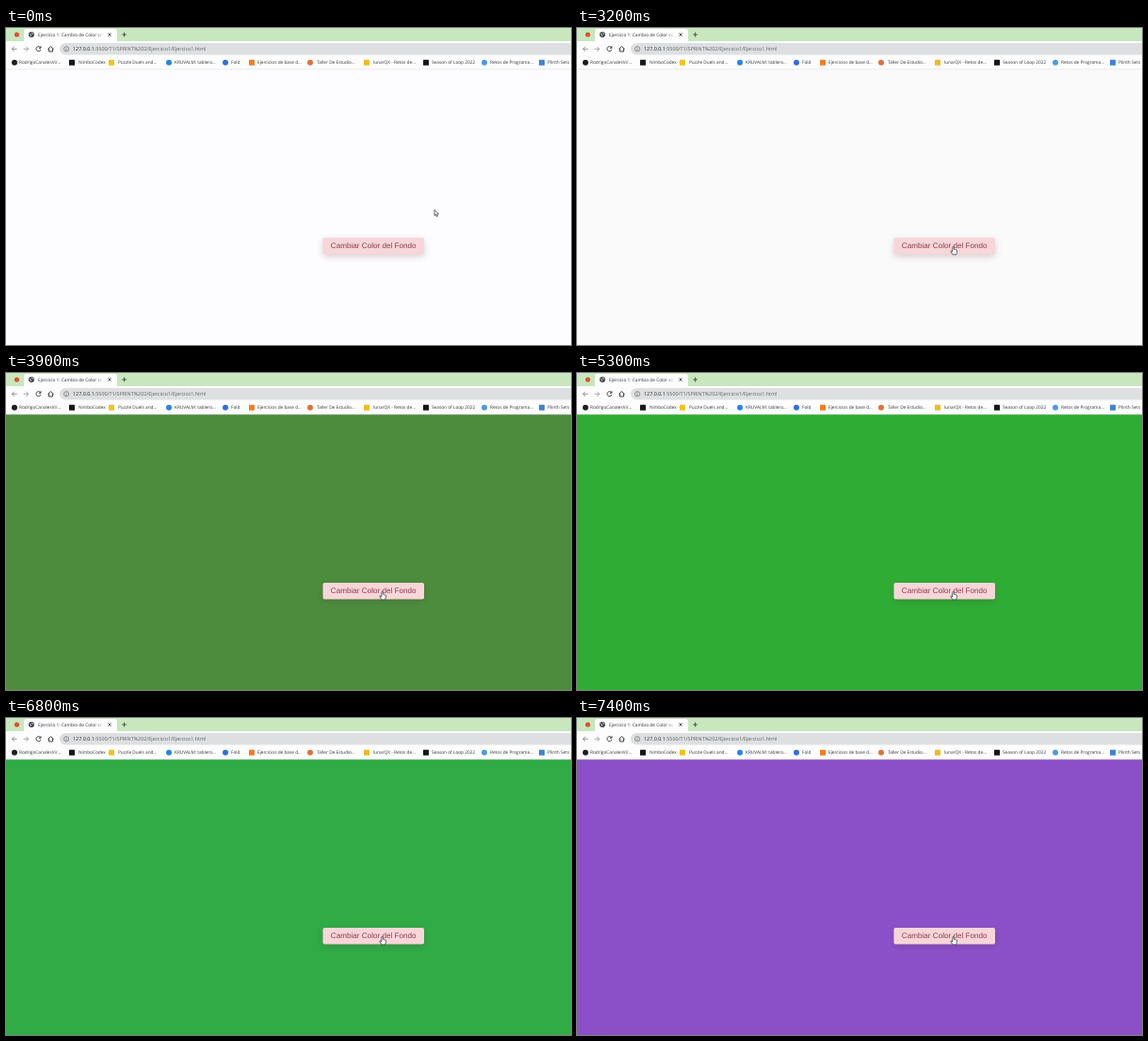
An HTML page with a canvas that plays this animation: 600x337 px, repeating every 8000 ms.

```html
<!DOCTYPE html>
<html lang="es">
<head>
<meta charset="utf-8">
<title>Ejercicio 1</title>
<style>
html, body { margin: 0; width: 100%; height: 100%; overflow: hidden; background: #fdfcfe; }
canvas { display: block; width: 600px; height: 337px; }
</style>
</head>
<body>
<canvas id="stage"></canvas>
<script>
const W = 600, H = 337, LOOP = 8000, STEP = 100;
const UI = '"Open Sans", "Noto Sans", sans-serif';
const canvas = document.getElementById('stage');
const ctx = canvas.getContext('2d');
const dpr = window.devicePixelRatio || 1;
canvas.width = Math.round(W * dpr);
canvas.height = Math.round(H * dpr);

const WHITE = [253, 252, 254], MOSS = [76, 140, 60], LIME = [32, 187, 47], PURPLE = [139, 80, 200];
const clamp = v => Math.max(0, Math.min(1, v));
const smooth = p => p * p * (3 - 2 * p);
const easeOut = p => 1 - (1 - p) ** 3;
const span = (t, a, b) => clamp((t - a) / (b - a));
const mix = (a, b, p) => a.map((v, i) => v + (b[i] - v) * p);
const rgb = c => `rgb(${c.map(Math.round).join()})`;

// Equivalent of the CSS "ease" curve
function ease(p) {
  if (p <= 0 || p >= 1) return clamp(p);
  let lo = 0, hi = 1;
  for (let i = 0; i < 20; i++) {
    const u = (lo + hi) / 2, v = 1 - u;
    if (3 * v * v * u * 0.25 + 3 * v * u * u * 0.25 + u ** 3 < p) lo = u; else hi = u;
  }
  const u = lo, v = 1 - u;
  return 3 * v * v * u * 0.1 + 3 * v * u * u + u ** 3;
}

function box(x, y, w, h, color, r = 0) {
  ctx.fillStyle = color;
  ctx.beginPath();
  ctx.roundRect(x, y, w, h, r);
  ctx.fill();
}

function dot(x, y, r, color) {
  ctx.fillStyle = color;
  ctx.beginPath();
  ctx.arc(x, y, r, 0, Math.PI * 2);
  ctx.fill();
}

function stroke(d, color, width = 0.8) {
  ctx.strokeStyle = color;
  ctx.lineWidth = width;
  ctx.stroke(new Path2D(d));
}

function text(s, x, y, size, color, family = UI) {
  ctx.font = `${size}px ${family}`;
  ctx.fillStyle = color;
  ctx.fillText(s, x, y);
  return ctx.measureText(s).width;
}

const bookmarks = [
  [9, 14, 'RodrigoCanalesVi/...', '#1b1f23', true],
  [70, 77, 'NimboCodex', '#14191e'],
  [112, 119, 'Puzzle Duels and...', '#f2c21c'],
  [173, 179, 'KRUVALM: tablero...', '#2684e8', true],
  [233, 239, 'Fold', '#2f6fe0', true],
  [261, 267, 'Ejercicios de base d...', '#f57d20'],
  [323, 330, 'Taller De Estudio...', '#e2703a', true],
  [383, 390, 'lunarQX - Retos de...', '#eebc20'],
  [446, 452, 'Season of Loop 2022', '#14181c'],
  [508, 514, 'Retos de Programa...', '#4a9be0', true],
  [569, 575, 'Plinth Sets', '#3f83d8']
];

function drawTabs() {
  box(0, 0, W, 15, '#c8e7be');
  box(19, 1, 99, 14, '#fdfdfe', [3, 3, 0, 0]);
  dot(11.5, 7, 2.6, '#e0502f');
  dot(27, 7, 3, '#3f4347');
  stroke('M25 6.2 L26.6 7 L26.2 8.8 M27.2 4.6 L28 6 L29.2 6.4', '#e8eaec', 0.8);
  text('Ejercicio 1: Cambio de Color con', 34, 8.8, 4.8, '#2e3134');
  const fade = ctx.createLinearGradient(97, 0, 103, 0);
  fade.addColorStop(0, 'rgba(253,253,254,0)');
  fade.addColorStop(1, '#fdfdfe');
  box(97, 2, 6, 11, fade);
  box(103, 2, 14, 11, '#fdfdfe');
  stroke('M108.4 5.4 L111.6 8.6 M111.6 5.4 L108.4 8.6', '#2e3134', 0.8);
  stroke('M123.2 7 H128 M125.6 4.6 V9.4', '#2e3134', 0.8);
}

function drawToolbar() {
  box(0, 14, W, 30, '#fdfdfe');
  box(57, 16, 560, 12.5, '#dedfe0', 6.2);
  stroke('M11.6 22.3 H6.5 M8.9 19.8 L6.4 22.3 L8.9 24.8', '#74787c');
  stroke('M18.6 22.3 H23.7 M21.3 19.8 L23.8 22.3 L21.3 24.8', '#8c9094');
  stroke('M36.6 20.8 A2.5 2.5 0 1 0 36.9 23', '#26292c', 0.9);
  stroke('M37 19.3 V21.3 H35', '#26292c', 0.9);
  stroke('M44.6 22.4 L47.6 19.6 L50.6 22.4 M45.6 22 V25 H49.6 V22', '#26292c', 0.9);
  stroke('M61.5 22.3 a2.6 2.6 0 1 0 5.2 0 a2.6 2.6 0 1 0 -5.2 0 M64.1 22 V23.8 M64.1 20.7 V21.3', '#505458', 0.6);
  const w = text('127.0.0.1', 71, 24.2, 5.4, '#1e2124');
  text(':5500/T1/SPRINT%202/Ejercicio1/Ejercico1.html', 71 + w, 24.2, 5.4, '#5c6064');
  for (const [cx, x, label, color, round] of bookmarks) {
    if (round) dot(cx, 36.7, 3, color);
    else box(cx - 3, 33.7, 6, 6, color, 0.5);
    text(label, x, 38.4, 4.75, '#303437');
  }
  box(0, 43.4, W, 0.8, '#e4e5e8');
}

function pageColor(t) {
  if (t >= 6800) return mix(LIME, PURPLE, ease(span(t, 6710, 7400)));
  if (t >= 5200) return mix(MOSS, LIME, easeOut(span(t, 5120, 5700)));
  if (t >= 3200) return mix(WHITE, MOSS, ease(span(t, 3180, 3900)));
  return WHITE;
}

function drawButton() {
  ctx.save();
  ctx.shadowColor = 'rgba(70,30,45,0.2)';
  ctx.shadowBlur = 7 * dpr;
  ctx.shadowOffsetY = 2.4 * dpr;
  box(336.5, 223, 107.5, 17.5, '#f7d6d9', 1.8);
  ctx.restore();
  text('Cambiar Color del Fondo', 344.8, 234.3, 8.15, '#8d3c4a', '"Liberation Sans", Arial, sans-serif');
}

const ARROW = new Path2D('M0 0 V6.2 L1.4 4.9 L2.5 7.2 L3.5 6.8 L2.5 4.5 H4.3 Z');
const HAND = new Path2D('M0 .8 Q0 0 .7 0 Q1.4 0 1.4 .8 V3 Q2 2.6 2.5 3.2 Q3.2 2.9 3.5 3.5 Q4.6 3.3 4.6 4.4 V6.2 L3.8 8.6 H.2 L-1.9 5.5 Q-2.2 4.6 -1.3 4.7 L0 5.7 Z');

function cursorAt(t) {
  const stops = [[100, 400, 450, 200], [500, 1400, 402, 233.5], [1400, 1700, 398.8, 232.3]];
  let p = [455, 193.3];
  for (const [a, b, x, y] of stops) p = mix(p, [x, y], smooth(span(t, a, b)));
  return p;
}

function drawCursor(t) {
  const [x, y] = cursorAt(t);
  const over = x > 336 && x < 444 && y > 223 && y < 240.5;
  const shape = over ? HAND : ARROW;
  ctx.save();
  ctx.translate(x, y);
  ctx.lineJoin = 'round';
  ctx.fillStyle = '#fff';
  ctx.strokeStyle = '#33343a';
  ctx.lineWidth = 0.75;
  ctx.fill(shape);
  ctx.stroke(shape);
  ctx.restore();
}

function draw(t) {
  ctx.setTransform(dpr, 0, 0, dpr, 0, 0);
  ctx.textRendering = 'geometricPrecision';
  box(0, 0, W, H, rgb(pageColor(t)));
  drawTabs();
  drawToolbar();
  drawButton();
  drawCursor(t);
}

const start = performance.now();
function frame() {
  const t = (performance.now() - start) % LOOP;
  draw(Math.floor(t / STEP) * STEP);
  requestAnimationFrame(frame);
}
draw(0);
requestAnimationFrame(frame);
</script>
</body>
</html>
```
